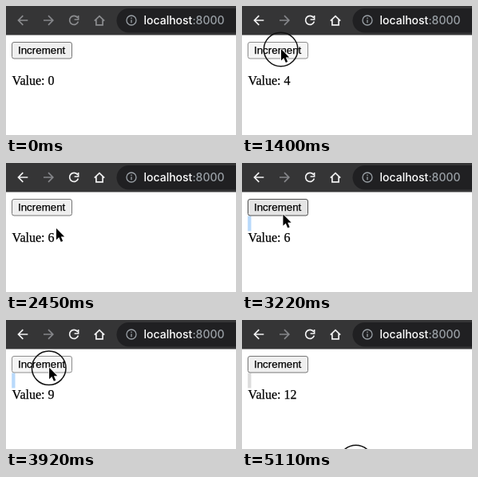
Animation of 288x162 px, one loop 5180 ms. Source, as an HTML page:

```html
<!DOCTYPE html>
<html lang="en">
<head>
<meta charset="utf-8">
<title>Increment</title>
<style>
  html, body { margin: 0; width: 100%; height: 100%; overflow: hidden; background: #fff; }
  svg { display: block; width: 288px; height: 162px; }
  .icon { fill: none; stroke-width: 1.7; }
  .url { font: 500 14px Inter, Roboto, sans-serif; fill: #fff; }
  .url .port { fill: #9aa0a6; }
  .label, .value { stroke: #000; stroke-width: .25; }
  .label { font: 13.333px "Liberation Sans", Arial, sans-serif; }
  .value { font: 16px "Liberation Serif", Times, serif; }
</style>
</head>
<body>
<svg viewBox="0 0 288 162">
  <rect width="288" height="36.5" fill="#353536"/>
  <rect x="138.5" y="3" width="170" height="30.5" rx="15.2" fill="#202022"/>
  <g id="nav" class="icon">
    <path d="M27.3 18H15.6M21.3 12.2L15.5 18l5.8 5.8"/>
    <path d="M89.4 14.4A5.5 5.5 0 1 0 90.4 19.4M90.6 12v5h-5"/>
    <path d="M110.8 18.6L117 12.6l6.2 6M112.9 17v6.8h8.2V17"/>
  </g>
  <path class="icon" stroke="#85868a" d="M47 18h11.7M53 12.2l5.8 5.8-5.8 5.8"/>
  <g class="icon" stroke="#9aa0a6" style="stroke-width:1.3">
    <circle cx="157" cy="18" r="6"/>
    <path d="M157 17.2v4M157 14.6v1.4"/>
  </g>
  <text class="url" x="172.5" y="23">localhost<tspan class="port">:8000</tspan></text>

  <rect id="selection" x="7.2" y="66.5" width="4.3" height="19"/>
  <rect id="button" x="7.5" y="45.5" width="75" height="20.5" rx="2.5"/>
  <text class="label" x="15" y="60.2">Increment</text>
  <text id="value" class="value" x="7.6" y="99.4"></text>

  <circle id="ring" r="21.3" fill="none" stroke="#111" stroke-width="1.5"/>
  <path id="cursor" d="M0 0V14.4L3.3 11.3 5.8 17 8.2 16 5.8 10.4H10.2Z"
    fill="#000" stroke="#fff" stroke-width="1.6" stroke-linejoin="round" paint-order="stroke"/>
</svg>
<script>
const LOOP = 5180, STEP = 70, HOLD = 70;
const FOCUS = 630, HOVER = 840, SELECT = 3080, BLUR = 5110;
const $ = id => document.getElementById(id);

// Each leg curves from the end of the previous one, bent towards "via".
const entry = [68, 90];
const legs = [
  { start: 140, end: 420, via: [58, 70], to: [49, 54] },
  { start: 1890, end: 2450, via: [92, 118], to: [63, 82] },
  { start: 2450, end: 2730, via: [25, 68], to: [49, 67] },
  { start: 3150, end: 3360, via: [53, 63], to: [55, 60] },
  { start: 3640, end: 4270, via: [54, 60], to: [53, 59] },
  { start: 4340, end: 4830, via: [56, 90], to: [143, 178] }
];

const burst = (start, count = 1, period = 0, ring = true) =>
  Array.from({ length: count }, (_, i) => ({ time: start + i * period, ring }));
const clicks = [
  burst(560), burst(840, 2, 210), burst(1260, 3, 70), burst(1610), burst(2870),
  burst(3430, 3, 140), burst(3920, 2, 175), burst(4270, 1, 0, false), burst(BLUR)
].flat();

function tipAt(t) {
  let from = entry;
  for (const { start, end, via, to } of legs) {
    if (t < start) break;
    const u = Math.min(1, (t - start) / (end - start)), v = 1 - u;
    const bend = i => v * v * from[i] + 2 * u * v * via[i] + u * u * to[i];
    from = [bend(0), bend(1)];
  }
  return from;
}

const isOver = t => t >= HOVER && tipAt(t)[1] < 66;
const countAt = t => clicks.filter(c => c.time + HOLD <= t && isOver(c.time)).length;

const looks = {
  normal: ["#efefef", "#767676"],
  hover: ["#e5e5e5", "#4f4f4f"],
  active: ["#f5f5f5", "#8d8d8d"]
};

function place(el, visible, x, y) {
  el.style.display = visible ? "" : "none";
  el.setAttribute("transform", `translate(${x} ${y})`);
}

function paint(el, fill, stroke = "none") {
  el.setAttribute("fill", fill);
  el.setAttribute("stroke", stroke);
}

function draw(now) {
  const t = Math.floor(now / STEP) * STEP;
  const [x, y] = tipAt(t);
  const press = clicks.find(c => t >= c.time && t < c.time + HOLD);
  const look = !isOver(t) ? "normal" : press ? "active" : "hover";

  $("nav").setAttribute("stroke", t < FOCUS ? "#8b8c8f" : "#f1f1f2");
  paint($("button"), ...looks[look]);
  paint($("selection"), t < SELECT ? "none" : t < BLUR ? "#b8d9fb" : "#dcdcdc");
  $("value").textContent = "Value: " + countAt(t);
  place($("cursor"), t >= 210, x, y);
  place($("ring"), press && press.ring, x - 0.4, y + 0.5);
}

const origin = performance.now();
function tick() {
  draw((performance.now() - origin) % LOOP);
  requestAnimationFrame(tick);
}
tick();
</script>
</body>
</html>
```
